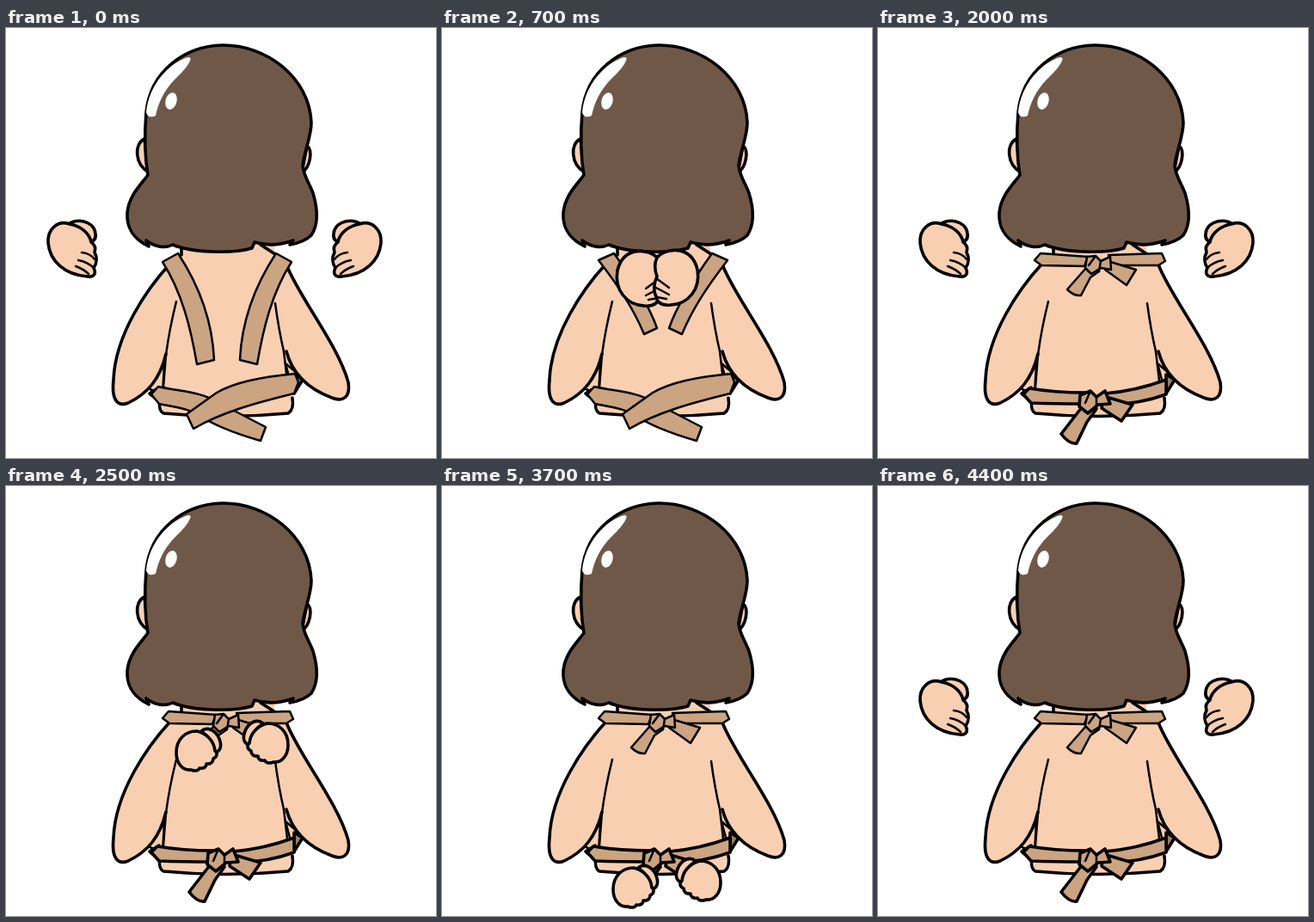
These frames come from a looping animation (500x500 px, 4.7 s). An HTML page:

```html
<!DOCTYPE html>
<html lang="en">
<head>
<meta charset="utf-8">
<title>Tying the apron</title>
<style>
html, body { margin: 0; width: 100%; height: 100%; overflow: hidden; background: #fff; }
svg { display: block; width: 100%; height: 100%; }
.ink { stroke: #000; stroke-width: 3.6; stroke-linejoin: round; stroke-linecap: round; }
.thin { stroke-width: 2.5; }
.skin { fill: #f9cfb2; }
.tan { fill: #cba482; }
.dark { fill: #9b7d63; }
.line { fill: none; }
</style>
</head>
<body>
<svg viewBox="0 0 500 500">
  <defs>
    <g id="open">
      <path class="ink skin" d="M-7 -27C2 -37 25 -34 27 -18C28 -12 25 -9 20 -8Z"/>
      <path class="ink skin" d="M-3 -29C-17 -34 -29 -23 -28 -7C-26 14 -9 30 18 32C26 33 28 28 25 22C29 16 29 9 26 4C28 -2 25 -6 22 -8C20 -19 9 -27 -3 -29Z"/>
      <path class="ink thin line" d="M7 13Q18 15 25 22M11 4Q21 5 26 12M4 20Q13 23 19 29"/>
    </g>
    <g id="grip">
      <path class="ink skin" d="M0 -17C7 -23 17 -18 21 -8C24 0 23 6 16 8C14 -3 9 -11 0 -17Z"/>
      <path class="ink skin" d="M-5 -17C-18 -17 -29 -8 -29 8C-29 20 -22 29 -12 28C-7 30 -3 29 -2 26C4 27 6 24 6 21C12 22 14 18 14 15C19 13 19 8 16 6C15 -5 7 -14 -5 -17Z"/>
    </g>
    <g id="fist">
      <path class="ink skin" d="M22 -22C12 -34 -18 -37 -25 -8C-29 15 -14 32 6 33C16 34 22 31 23 23C27 16 25 6 22 0C25 -8 25 -16 22 -22Z"/>
      <path class="ink thin line" d="M23 2L8 13M25 12L8 21M22 24L11 26"/>
    </g>
  </defs>

  <path class="skin" d="M204 250V264L188 275L181 435L182 449Q255 455 328 449L332 430L328 275L312 263V250Z"/>
  <path class="ink line" d="M204 255V264M296 252L313 263M179 432Q177 445 183 448Q255 455 328 448Q335 444 333 430"/>
  <path class="ink thin skin" d="M184 392L165 419L182 426ZM325 390L346 408L333 420Z"/>
  <path class="ink skin" d="M190 275C165 302 127 356 125 409C122 436 132 440 142 436C165 425 179 408 186 379"/>
  <path class="ink skin" d="M326 275C340 312 386 368 398 412C401 430 391 435 379 430C352 420 333 402 326 376"/>
  <path class="ink thin line" d="M198 318Q190 350 186 380L183 418M313 320Q317 350 323 376L327 410"/>
  <path class="ink dark" d="M178 418L167 425L178 434ZM335 403L345 409L335 425Z"/>

  <g id="waistLoose">
    <path class="ink thin tan" d="M177 417C205 423 226 423 246 435L302 464L296 480C268 472 243 463 222 449C207 440 190 440 178 437L169 426Z"/>
    <path class="ink thin tan" d="M336 402C295 406 266 412 245 424L210 449L218 466C250 447 290 436 335 425L340 412Z"/>
  </g>
  <g id="waistTied">
    <path class="ink tan" d="M176 419Q205 424 242 424L240 437Q205 437 178 436L169 426ZM264 425Q300 422 335 409L335 426Q305 437 270 438Z"/>
    <path class="ink tan" d="M262 428L296 438L283 457L260 442Z"/>
    <path class="ink tan" d="M237 441L213 472Q222 484 231 483L243 458L254 443Z"/>
    <path class="ink tan" d="M235 427L247 422L254 429L264 422L270 437L256 438L244 448L234 440Z"/>
    <path class="ink thin line" d="M247 422L241 436M254 429L254 443"/>
  </g>

  <path id="strapL" class="ink thin tan"/>
  <path id="strapR" class="ink thin tan"/>
  <g id="neckTied">
    <path class="ink thin tan" d="M189 262L244 266L240 277L190 276L182 270Z"/>
    <path class="ink thin tan" d="M268 264L330 262L334 271L326 276L272 276Z"/>
    <path class="ink thin tan" d="M267 271L300 281L289 299L264 281Z"/>
    <path class="ink thin tan" d="M242 279L220 304Q228 312 236 311L247 290L257 283Z"/>
    <path class="ink thin tan" d="M243 266L253 265L259 271L270 266L271 281L259 279L248 286L241 279Z"/>
    <path class="ink thin line" d="M253 265L245 276M259 271L257 283"/>
  </g>

  <path class="ink skin" d="M161 129C149 134 149 158 166 168ZM350 137C357 142 354 162 344 168Z"/>
  <path class="ink" fill="#705849" d="M251 20C303 19 353 58 355 110C355 127 346 146 345 160C346 172 353 181 357 192C363 212 363 229 355 241Q347 249 330 252L334 247C318 253 302 253 289 249L286 256C262 263 215 261 194 252C184 257 172 254 163 247L166 254C148 245 140 233 141 215C143 195 156 183 165 171C161 148 161 122 163 98C168 50 208 21 251 20Z"/>
  <path fill="#fff" d="M212 34C190 40 166 66 163 98Q165 106 174 102C177 88 183 73 197 59Q211 46 214 38Q216 34 212 34Z"/>
  <ellipse cx="192" cy="85" rx="6.5" ry="10" fill="#fff" transform="rotate(15 192 85)"/>

  <use id="handL"/>
  <use id="handR"/>
</svg>
<script>
const LOOP = 4700, STEP = 100;
const el = id => document.getElementById(id);

// time, left x, left y, right x, right y, pose held until the next key
const keys = [
  [0, 77, 257, 408, 257, 'open'],
  [400, 202, 308, 309, 302, 'grip'],
  [500, 202, 308, 309, 302, 'grip'],
  [700, 229, 290, 272, 289, 'fist'],
  [900, 240, 290, 262, 289, 'fist'],
  [1100, 227, 302, 276, 303, 'fist'],
  [1300, 227, 302, 276, 303, 'fist'],
  [1400, 227, 360, 276, 362, 'fist'],
  [1500, 227, 430, 276, 432, 'fist'],
  [1700, 238, 442, 266, 442, 'fist'],
  [1800, 222, 440, 288, 436, 'grip'],
  [1900, 148, 350, 340, 350, 'open'],
  [2000, 77, 257, 408, 257, 'open'],
  [2500, 227, 302, 299, 293, 'grip'],
  [2700, 215, 291, 307, 283, 'grip'],
  [2900, 215, 291, 307, 283, 'grip'],
  [3000, 202, 306, 311, 298, 'grip'],
  [3500, 228, 467, 295, 459, 'grip'],
  [3700, 228, 461, 295, 453, 'grip'],
  [4000, 162, 374, 345, 370, 'open'],
  [4400, 77, 257, 408, 257, 'open'],
  [LOOP, 77, 257, 408, 257, 'open']
];

function handsAt(t) {
  const i = keys.findIndex(k => k[0] > t) - 1;
  const a = keys[i], b = keys[i + 1], p = (t - a[0]) / (b[0] - a[0]);
  const mix = n => a[n] + (b[n] - a[n]) * p;
  return { left: [mix(1), mix(2)], right: [mix(3), mix(4)], pose: a[5] };
}

// The right strap mirrors the left one about x = 257.
function strapPath(bend, mirrored) {
  const pt = (x0, y0, x1, y1) => {
    const x = x0 + (x1 - x0) * bend;
    return `${mirrored ? 514 - x : x} ${y0 + (y1 - y0) * bend} `;
  };
  return 'M' + pt(182, 272, 182, 270) +
    'C' + pt(205, 308, 205, 300) + pt(215, 350, 222, 325) + pt(222, 391, 235, 356) +
    'L' + pt(242, 386, 250, 349) +
    'C' + pt(240, 340, 240, 320) + pt(225, 300, 220, 290) + pt(200, 262, 200, 262) + 'Z';
}

function show(id, visible) {
  el(id).setAttribute('visibility', visible ? 'visible' : 'hidden');
}

function placeHand(id, pose, [x, y], flip) {
  el(id).setAttribute('href', '#' + pose);
  el(id).setAttribute('transform', `translate(${x} ${y}) scale(${flip} 1)`);
}

function draw(time) {
  const t = Math.floor((time % LOOP) / STEP) * STEP;
  const neckTied = t >= 1000, waistTied = t >= 1700;
  const bend = Math.min(1, Math.max(0, (t - 500) / 200));
  el('strapL').setAttribute('d', strapPath(bend, false));
  el('strapR').setAttribute('d', strapPath(bend, true));
  show('strapL', !neckTied);
  show('strapR', !neckTied);
  show('neckTied', neckTied);
  show('waistLoose', !waistTied);
  show('waistTied', waistTied);
  const { left, right, pose } = handsAt(t);
  placeHand('handL', pose, left, 1);
  placeHand('handR', pose, right, -1);
}

function tick() {
  draw(performance.now());
  requestAnimationFrame(tick);
}
tick();
</script>
</body>
</html>
```
